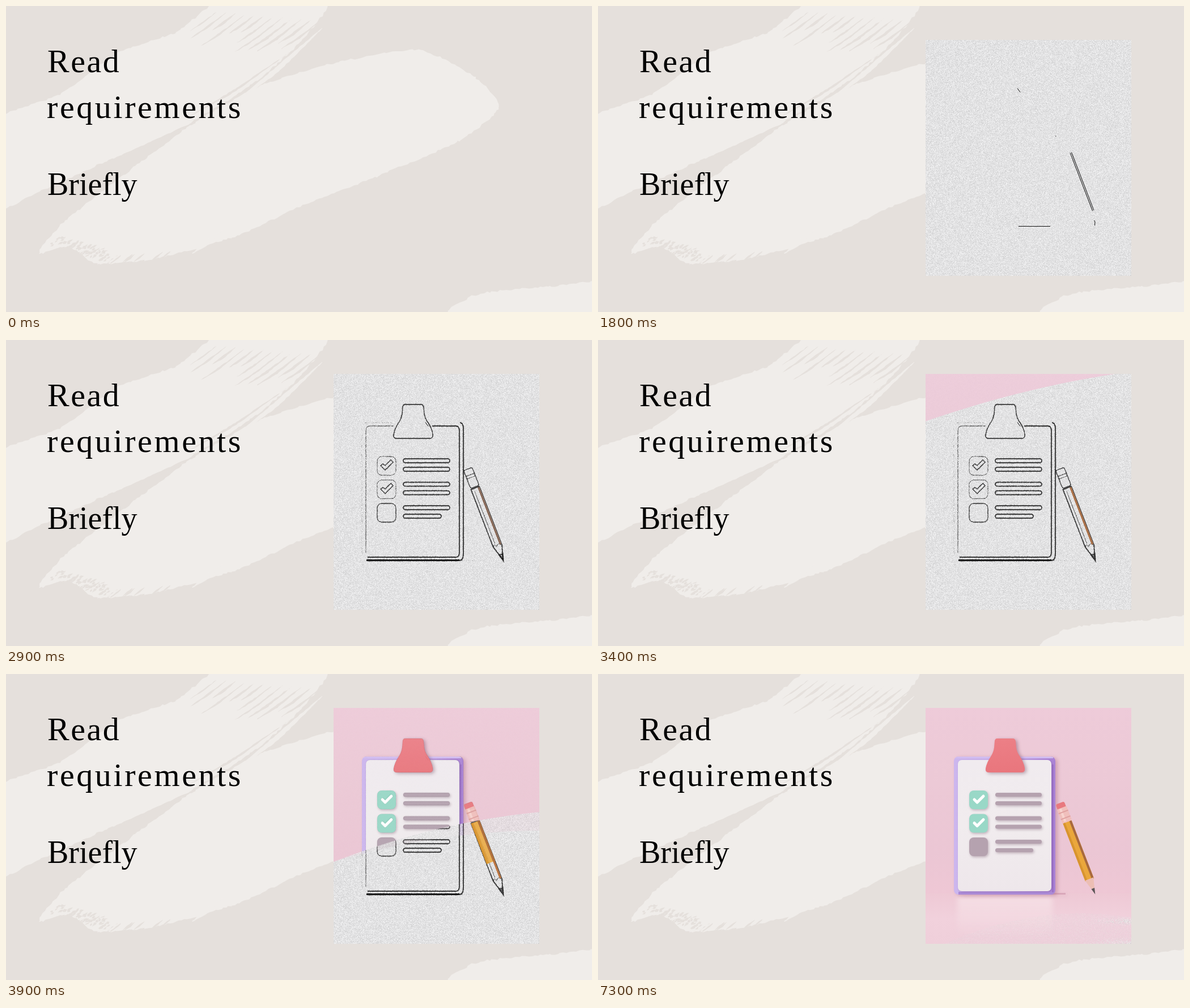
These frames come from a looping animation (1034 by 541 pixels, 7.4 s). An HTML page with a canvas:

```html
<!DOCTYPE html>
<html lang="en">
<head>
<meta charset="utf-8">
<title>Read requirements</title>
<style>
html, body { margin: 0; width: 100%; height: 100%; overflow: hidden; background: #e5e0dc; }
canvas, svg { position: absolute; left: 0; top: 0; display: block; }
text { font-family: "Liberation Serif", "Times New Roman", serif; font-size: 58px; fill: #000; }
</style>
</head>
<body>
<canvas id="stage" width="1034" height="541"></canvas>
<svg width="1034" height="541">
  <text x="73" y="117" letter-spacing="2.5">Read</text>
  <text x="72" y="198" letter-spacing="3.6">requirements</text>
  <text x="73" y="334" style="font-size:56px">Briefly</text>
</svg>
<script>
const LOOP = 7400, PX = 578, PY = 60, PW = 363, PH = 417;
const PAPER = '#e5e0dc', BRUSH = '#f0edea';
const stage = document.getElementById('stage').getContext('2d');

let seed = 7;
const rnd = () => (seed = (seed * 16807) % 2147483647) / 2147483647;
const clamp = (v, a = 0, b = 1) => Math.min(b, Math.max(a, v));
const mix = (a, b, k) => a + (b - a) * k;

function layer(w, h, x = 0, y = 0) {
  const c = document.createElement('canvas');
  c.width = w; c.height = h;
  const g = c.getContext('2d');
  g.translate(-x, -y);
  return g;
}
const panel = () => layer(PW, PH, PX, PY);

// Panel-sized canvas filled from rgba(x, y, index)
function pixels(rgba) {
  const g = panel(), img = g.createImageData(PW, PH);
  for (let i = 0; i < PW * PH; i++) {
    img.data.set(rgba(PX + i % PW, PY + Math.floor(i / PW), i), i * 4);
  }
  g.putImageData(img, 0, 0);
  return g.canvas;
}

function gradient(g, x0, y0, x1, y1, ...stops) {
  const f = g.createLinearGradient(x0, y0, x1, y1);
  stops.forEach((s, i) => f.addColorStop(i / (stops.length - 1), s));
  return f;
}

/* ---------- brushed backdrop ---------- */
// Closed spline through a few points, with a ragged edge
function blot(g, pts, ragged, color) {
  const at = i => pts[(i + pts.length) % pts.length];
  const hermite = (a, b, c, d, k) => {
    const m0 = (c - a) * 0.35, m1 = (d - b) * 0.35, k2 = k * k, k3 = k2 * k;
    return (2 * k3 - 3 * k2 + 1) * b + (k3 - 2 * k2 + k) * m0 + (3 * k2 - 2 * k3) * c + (k3 - k2) * m1;
  };
  g.beginPath();
  pts.forEach((p, i) => {
    const [a, c, d] = [at(i - 1), at(i + 1), at(i + 2)];
    const n = Math.ceil(Math.hypot(c[0] - p[0], c[1] - p[1]) / 5);
    for (let k = 0; k < n; k++) {
      g.lineTo(...[0, 1].map(j => hermite(a[j], p[j], c[j], d[j], k / n) + (rnd() - 0.5) * ragged));
    }
  });
  g.fillStyle = color;
  g.fill();
}

function streak(g, x, y, dx, dy, w, color) {
  const l = Math.hypot(dx, dy), ox = -dy / l * w / 2, oy = dx / l * w / 2;
  const mx = x + dx * 0.55, my = y + dy * 0.55 + l * 0.025;
  blot(g, [[x, y], [mx + ox, my + oy], [x + dx, y + dy], [mx - ox, my - oy]], 1.2, color);
}

function makeBackdrop() {
  const g = layer(1034, 541);
  g.fillStyle = PAPER;
  g.fillRect(0, 0, 1034, 541);
  blot(g, [[-20, 206], [95, 156], [200, 82], [300, 46], [385, -12], [565, -12], [520, 62],
    [440, 134], [300, 222], [180, 273], [60, 328], [-20, 356]], 3, BRUSH);
  blot(g, [[58, 437], [105, 379], [226, 285], [330, 208], [450, 141], [575, 102], [727, 78], [830, 128],
    [869, 180], [800, 238], [650, 303], [520, 354], [400, 409], [265, 446], [160, 455], [110, 425]], 3, BRUSH);
  blot(g, [[788, 545], [812, 518], [850, 506], [960, 496], [1050, 490], [1050, 560]], 3, BRUSH);
  streak(g, 558, 39, -150, 128, 9, BRUSH);
  streak(g, 382, 396, -54, 42, 7, BRUSH);
  streak(g, 500, 82, -178, 114, 4, PAPER);
  streak(g, 330, 206, -140, 64, 7, PAPER);
  // Bristle gaps at the top, dry specks at the lower tail
  for (let i = 0; i < 12; i++) {
    const k = i / 11, l = 40 + rnd() * 45;
    streak(g, mix(372, 555, k), mix(10, 26, k), -l, l * 0.72, 2 + rnd() * 3, PAPER);
  }
  for (let i = 0; i < 90; i++) {
    const k = rnd();
    streak(g, 78 + k * 100, 405 + k * 28 + rnd() * 24, 3 + rnd() * 7, -2 - rnd() * 4, 2 + rnd() * 3, PAPER);
  }
  for (let i = 0; i < 14; i++) {
    const d = rnd() * 140;
    streak(g, 140 + d, 459 - d * 0.08, 20, -15, 3, i % 2 ? BRUSH : PAPER);
  }
  return g.canvas;
}

/* ---------- shared shapes ---------- */
function rect(x, y, w, h, r = 0) {
  const p = new Path2D();
  p.roundRect(x, y, w, h, r);
  return p;
}
const rows = [0, 1, 2].map(i => 206 + 41.5 * i);
const board = rect(628, 146, 179, 244, 8);
const sheet = rect(635, 152, 165, 232, 7);
const clip = new Path2D('M704 114H732Q736 114 737 119L738 130Q739 138 744 145Q751 155 753 166Q754 174 748 174' +
  'H689Q683 174 684 167Q686 156 693 146Q698 138 699 130L700 118Q701 114 704 114Z');
const boxes = rows.map(y => rect(655, y, 33, 33, 8));
const bars = rows.flatMap((y, i) => [rect(701, y + 4, 82, 7, 3.5), rect(701, y + 19, i < 2 ? 82 : 67, 7, 3.5)]);
const tick = y => new Path2D(`M664 ${y + 16}l5 5l11 -11`);
const hook = y => new Path2D(`M661 ${y + 16}l4 -3l4 3l10 -10l4 4l-14 14Z`);
const cone = new Path2D('M144 -8L172 0L144 8Z');
const lead = new Path2D('M162 -3L173 0L162 3Z');

// Local x runs from eraser to tip
function onPencil(g, draw) {
  g.save();
  g.translate(815, 228);
  g.rotate(68.9 * Math.PI / 180);
  draw();
  g.restore();
}

/* ---------- coloured picture ---------- */
function makePhoto() {
  const g = panel();
  const fill = (c, p) => { g.fillStyle = c; g.fill(p); };
  const shade = (c, b, x, y) => { g.shadowColor = c; g.shadowBlur = b; g.shadowOffsetX = x; g.shadowOffsetY = y; };
  const flat = () => shade('transparent', 0, 0, 0);

  fill(gradient(g, 0, 60, 0, 330, '#eecbd9', '#ecc9d6', '#ebc6d4'), rect(PX, PY, PW, 330));
  fill(gradient(g, 0, 318, 0, 390, 'rgba(240,200,213,0)', 'rgba(240,200,213,.7)'), rect(PX, 318, PW, 72));
  fill(gradient(g, 0, 388, 0, 477, '#eec9d5', '#f1d1dc', '#efcfda'), rect(PX, 388, PW, 89));
  g.filter = 'blur(5px)';
  fill(gradient(g, 0, 390, 0, 465, 'rgba(248,232,235,.7)', 'rgba(248,232,235,0)'), rect(634, 393, 168, 72));
  g.filter = 'none';

  shade('rgba(150,80,110,.35)', 7, 4, 2);
  fill('rgba(190,125,150,.4)', rect(640, 387, 185, 3));
  fill(gradient(g, 628, 0, 807, 0, '#ccb6ee', '#c8b0ea', '#a981d4'), board);
  flat();
  g.save();
  g.clip(board);
  fill('#ab8ad6', rect(636, 385, 171, 5));
  fill('#9c72c8', rect(801, 160, 3, 226));
  fill('#d2bdf0', rect(628, 146, 175, 3));
  g.restore();
  shade('rgba(110,70,140,.4)', 3, 1, 1);
  fill(gradient(g, 0, 152, 0, 384, '#f0ebef', '#f1ecee', '#eee7eb'), sheet);
  shade('rgba(110,65,90,.45)', 6, 3, 2);
  fill(gradient(g, 0, 114, 0, 174, '#ec7f86', '#e9767d'), clip);
  shade('rgba(120,90,110,.4)', 4, 1.5, 2);
  boxes.forEach((b, i) => fill(i < 2 ? '#99d8c7' : '#b5a2af', b));
  bars.forEach(b => fill('#b5a2af', b));
  flat();
  g.strokeStyle = '#fff';
  g.lineWidth = 5;
  g.lineCap = g.lineJoin = 'round';
  rows.slice(0, 2).forEach(y => g.stroke(tick(y)));

  onPencil(g, () => {
    fill('#e8797f', rect(0, -8, 14, 16, 3));
    fill('#f0bfbc', rect(9, -9, 27, 18, 2));
    fill('#f7d3ce', rect(10, 1, 24, 4));
    [16, 27].forEach(x => fill('#dfa09f', rect(x, -9, 2, 18)));
    barrel(g, 110);
    fill('#ecbeb4', cone);
    fill('#5b5659', lead);
  });
  return g.canvas;
}

function barrel(g, length) {
  const band = (color, y, h) => { g.fillStyle = color; g.fillRect(36, y, length, h); };
  band('#eaa73c', -8, 16);
  band('#d8942f', 4, 4);
  band('#a8693f', -8, 4);
}

/* ---------- pencil sketch ---------- */
function makeStrength() {
  const g = panel();
  const line = (p, a, w = 1.3) => {
    const path = typeof p === 'string' ? new Path2D(p) : p;
    for (const [alpha, width] of [[a * 0.3, w + 2.5], [a, w]]) {
      g.strokeStyle = `rgba(0,0,0,${alpha})`;
      g.lineWidth = width;
      g.stroke(path);
    }
  };
  line('M628 384V154Q628 146 636 146H684', 0.2);
  line('M684 152H643Q635 152 635 160V376', 0.4);
  line('M752 152H793Q800 152 800 160V376Q800 384 793 384H638', 0.8);
  line('M801 146Q807 147 807 156V380Q807 390 798 390H636', 0.8);
  line('M636 389H800', 0.9, 1.8);
  line('M800 390H828', 0.2);
  line(clip, 0.65);
  boxes.forEach((b, i) => line(b, i < 2 ? 0.38 : 0.55));
  rows.slice(0, 2).forEach(y => line(hook(y), 0.6));
  bars.forEach(b => line(b, 0.75));
  onPencil(g, () => {
    line(rect(0, -8, 34, 16, 3), 0.55);
    line('M11 -9V8M16 -8V8M40 3H140M145 8Q139 4 146 2Q140 -2 146 -8', 0.4);
    line('M36 -8V8H145L172 0L146 -8', 0.75);
    line(lead, 0.8);
  });
  const d = g.getImageData(0, 0, PW, PH).data;
  return Float32Array.from({ length: PW * PH }, (_, i) => d[i * 4 + 3]);
}

const backdrop = makeBackdrop();
const noise = Float32Array.from({ length: PW * PH }, rnd);
const gray = i => 209 + 34 * noise[i];
const grain = pixels((x, y, i) => [gray(i), gray(i), gray(i) + 1, 255]);
const photo = makePhoto();
const strength = makeStrength();
const leftover = pixels((x, y, i) => {
  const u = (x - 610) / 331, edge = 477 - 148 * u + 101 * u * u;
  const corner = clamp((x - 850) / 91) * clamp(1 - Math.min(Math.abs(y - 437) / 9, (477 - y) / 12));
  const on = noise[(i * 7 + 13) % noise.length] < 0.35 + corner * 0.5;
  return [gray(i), gray(i), gray(i), u < 0 || y < edge ? 0 : on ? 60 + 160 * corner : 15];
});

// The few strongest edges surface first
function firstEdges(t) {
  stage.save();
  stage.globalAlpha = clamp((t - 1200) / 500);
  stage.strokeStyle = '#111';
  stage.lineWidth = 1;
  stage.stroke(new Path2D('M740 145.5L745 152.5M742 389.5H798M875.5 379L877 382L876.5 388M807 230H808.5'));
  onPencil(stage, () => stage.stroke(new Path2D('M36 -8H146M36 -5.5H146')));
  stage.restore();
}

// Grainy threshold that sinks until the faint edges show too
function sketch(t) {
  const cut = mix(215, 15, clamp((t - 2100) / 700));
  return pixels((x, y, i) => {
    const a = clamp((strength[i] - cut - noise[i] * 65) / 70);
    return [15, 15, 15, 255 * a * (0.3 + 0.7 * strength[i] / 255)];
  });
}

// Colour seeps into the pencil ahead of the wipe
function tintPencil(t) {
  const k = clamp((t - 2900) / 700);
  onPencil(stage, () => {
    stage.fillStyle = `rgba(${mix(138, 190, k)},${mix(92, 116, k)},${mix(66, 62, k)},${mix(0.65, 0.95, k)})`;
    stage.fillRect(37, -7.5, 108, 3.5);
    stage.fillStyle = `rgba(80,80,82,${0.8 * k})`;
    stage.fill(lead);
    stage.globalAlpha = 0.85;
    barrel(stage, 110 * clamp((t - 3600) / 430));
  });
}

// Photo above a bowed edge that sinks through the panel
function wipe(t, drop, alpha) {
  const s = (t - 3600) / 300;
  const left = 219 + (s < 0 ? 113 * s : 95 * s + 18 * s * s);
  const bow = 38 + 15 * Math.max(0, s);
  stage.save();
  stage.beginPath();
  stage.moveTo(PX, PY - 400);
  for (let u = 0; u <= 1; u += 1 / 32) {
    stage.lineTo(PX + PW * u, left - (88 + bow) * u + bow * u * u + drop * u);
  }
  stage.lineTo(PX + PW, PY - 400);
  stage.clip();
  stage.globalAlpha = alpha;
  stage.drawImage(photo, PX, PY);
  stage.restore();
}

function draw(t) {
  stage.drawImage(backdrop, 0, 0);
  if (t < 900) return;
  if (t >= 7300) {
    stage.drawImage(photo, PX, PY);
    stage.drawImage(leftover, PX, PY);
    return;
  }
  stage.drawImage(grain, PX, PY);
  if (t >= 1300) firstEdges(t);
  if (t >= 2100) stage.drawImage(sketch(t), PX, PY);
  if (t >= 2900) {
    const at = Math.min(t, 4200);
    tintPencil(at);
    wipe(at, 33 * clamp(1 - Math.abs(at - 3900) / 300), 0.22);
    wipe(at, 0, mix(0.87, 1, clamp((at - 3600) / 600)));
  }
}

let shown = -1;
function loop() {
  const t = Math.floor(performance.now() % LOOP / 100) * 100;
  if (t !== shown) draw(shown = t);
  requestAnimationFrame(loop);
}
loop();
</script>
</body>
</html>
```
